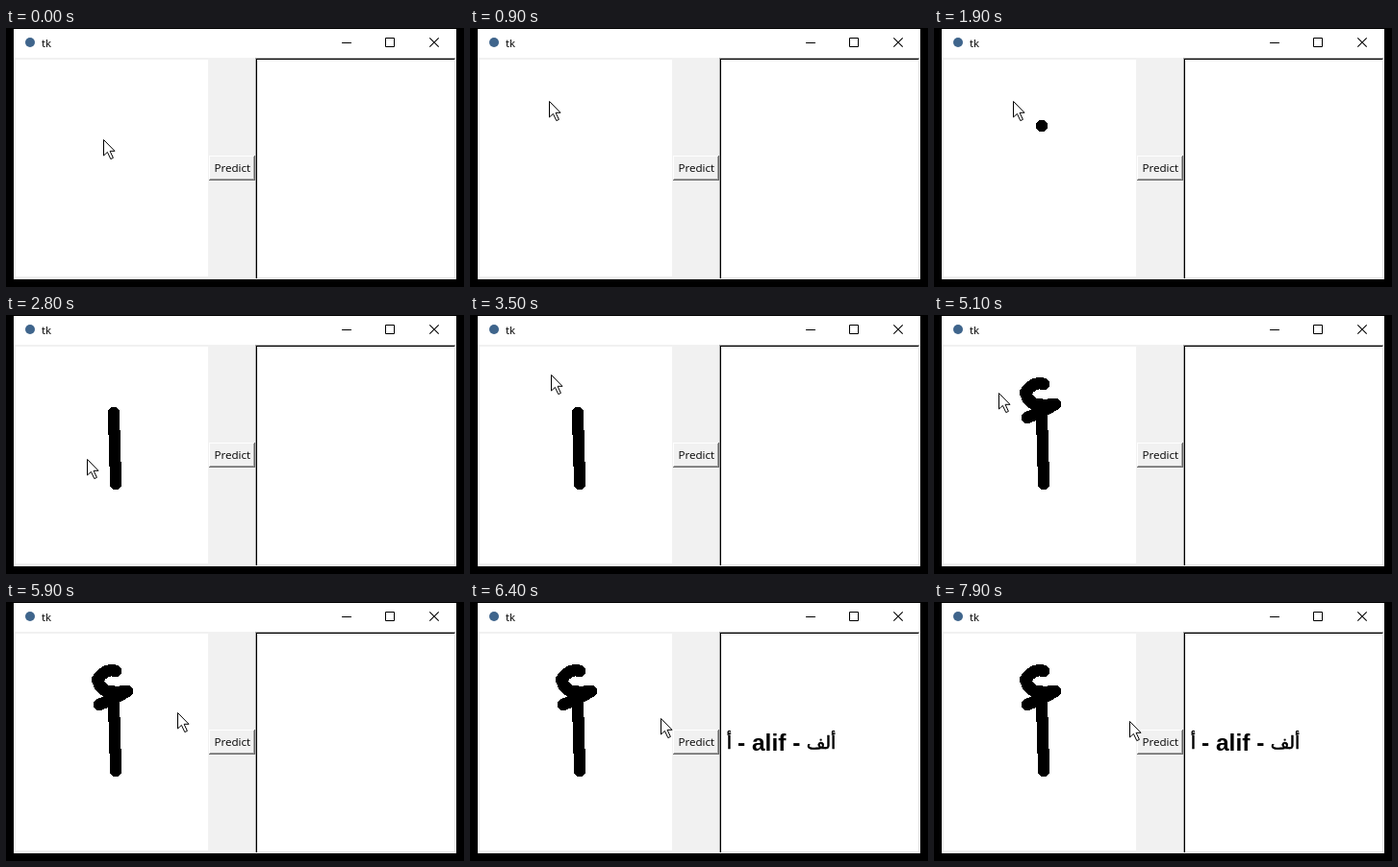
Recreate the animation shown at these times as an HTML page. Size 476 px wide and 270 px high, loop 8 s.

```html
<!DOCTYPE html>
<html lang="en">
<head>
<meta charset="utf-8">
<title>tk</title>
<style>
  html, body { margin: 0; width: 100%; height: 100%; overflow: hidden; background: #000; }
  svg { display: block; width: 476px; height: 270px; }
  .ui { font: 500 11.6px "Open Sans", "Noto Sans", sans-serif; }
  .latin { font: bold 24.5px "Liberation Sans", Arial, sans-serif; }
  .arabic { font: 19px "DejaVu Sans", sans-serif; text-anchor: middle; stroke: #000; stroke-width: .5; }
  .crisp { shape-rendering: crispEdges; }
</style>
</head>
<body>
<svg viewBox="0 0 476 270">
  <g class="crisp">
    <rect width="476" height="270" fill="#000"/>
    <rect x="8" y="1" width="460" height="261" fill="#f1f1f1"/>
    <rect x="8" y="1" width="460" height="30" fill="#fff"/>
    <rect x="10" y="33" width="200" height="226" fill="#fff"/>
    <rect x="259" y="31" width="208" height="230" fill="#a0a0a0"/>
    <rect x="260" y="32" width="206" height="229" fill="#000"/>
    <rect x="261" y="33" width="206" height="228" fill="#e6e6e6"/>
    <rect x="261" y="33" width="205" height="227" fill="#fff"/>
  </g>
  <circle cx="25" cy="15" r="5" fill="#3f658c"/>
  <text class="ui" x="37" y="20">tk</text>
  <g fill="none" stroke="#000">
    <path d="M349 15.5H359M394.5 10.5H403.5V19.5H394.5Z"/>
    <path d="M440.3 10.3L449.7 19.7M449.7 10.3L440.3 19.7" stroke-width="1.1"/>
  </g>

  <path id="ink" class="crisp" fill="none" stroke="#000" stroke-width="12.5"
        stroke-linecap="round" stroke-linejoin="round"/>

  <g class="crisp">
    <rect x="211" y="133" width="48" height="26" fill="#f1f1f1"/>
    <path id="lit" fill="none" d="M211.5 158V133.5H258"/>
    <path id="shade" fill="none" d="M211 158.5H258.5V133"/>
    <path id="inner" fill="none" d="M212 157.5H257.5V134"/>
  </g>
  <text id="label" class="ui" x="235.3" y="150" text-anchor="middle">Predict</text>

  <g id="result">
    <text class="arabic" x="269.5" y="153">أ</text>
    <text class="latin" x="278" y="155">- alif -</text>
    <text class="arabic" x="365" y="153">ألف</text>
  </g>

  <path id="cursor" fill="#fff" stroke="#000"
        d="M.5 .5V17L4.4 13.4L7.8 20.6L10.4 19.4L7.1 12.3H12Z"/>
</svg>
<script>
const LOOP = 8000, STEP = 100;
const PRESS = 6200, RELEASE = 6300;
const BRUSH = [30, 26];                    // brush position relative to the pointer tip

const linear = k => k;
const smooth = k => k * k * (3 - 2 * k);
const late = k => k * k * k;

// Each move starts where the one before it ended.
const HOME = [101, 116];
const MOVES = [
  { from: 0,    to: 900,  ease: smooth, via: [[82, 76]] },
  { from: 1900, to: 2800, ease: linear, via: [[84, 150]], pen: true },
  { from: 2900, to: 3700, ease: smooth, via: [[84, 46]] },
  { from: 3800, to: 4600, ease: linear, via: [[75, 46], [65, 55], [74, 67], [96, 67]], pen: true },
  { from: 4700, to: 5100, ease: linear, via: [[67, 81]], pen: true },
  { from: 5300, to: 6100, ease: smooth, via: [[198, 121]] },
  { from: 6300, to: 7900, ease: late,   via: [[203, 124]] }
];
MOVES.forEach((m, i) => {
  m.points = [i ? MOVES[i - 1].points.at(-1) : HOME, ...m.via];
});

const el = id => document.getElementById(id);
const ink = el("ink"), cursor = el("cursor"), label = el("label"), result = el("result");
const lit = el("lit"), shade = el("shade"), inner = el("inner");

// Catmull-Rom curve through the points, k from 0 to 1
function along(points, k) {
  const last = points.length - 1;
  const i = Math.min(last - 1, Math.floor(k * last)), u = k * last - i;
  const at = n => points[Math.max(0, Math.min(last, n))];
  const [a, b, c, d] = [at(i - 1), at(i), at(i + 1), at(i + 2)];
  if (last === 1) return b.map((v, n) => v + (c[n] - v) * u);
  return b.map((v, n) => v + u / 2 * (c[n] - a[n]
    + u * (2 * a[n] - 5 * v + 4 * c[n] - d[n]
    + u * (3 * (v - c[n]) + d[n] - a[n]))));
}

function place(move, t) {
  const k = Math.min(1, (t - move.from) / (move.to - move.from));
  return along(move.points, move.ease(k)).map(Math.round);
}

const tip = t => place(MOVES.findLast(m => m.from <= t), t);

function strokePath(move, now) {
  const points = [];
  for (let t = move.from; t <= Math.min(move.to, now); t += STEP)
    points.push(place(move, t).map((v, n) => v + BRUSH[n]).join(" "));
  // the repeated first point makes a lone dot visible
  return points.length ? `M${points[0]}L${points.join("L")}` : "";
}

function draw(t) {
  const down = t >= PRESS && t < RELEASE;
  cursor.setAttribute("transform", `translate(${tip(t)})`);
  ink.setAttribute("d", MOVES.filter(m => m.pen).map(m => strokePath(m, t)).join(""));
  lit.setAttribute("stroke", down ? "#696969" : "#fff");
  shade.setAttribute("stroke", down ? "#fff" : "#696969");
  inner.setAttribute("stroke", down ? "#e3e3e3" : "#a0a0a0");
  label.setAttribute("transform", down ? "translate(1 1)" : "translate(0 0)");
  result.setAttribute("visibility", t >= RELEASE ? "visible" : "hidden");
}

const start = performance.now();
function tick() {
  const t = (performance.now() - start) % LOOP;
  draw(Math.floor(t / STEP) * STEP);
  requestAnimationFrame(tick);
}
draw(0);
requestAnimationFrame(tick);
</script>
</body>
</html>
```
